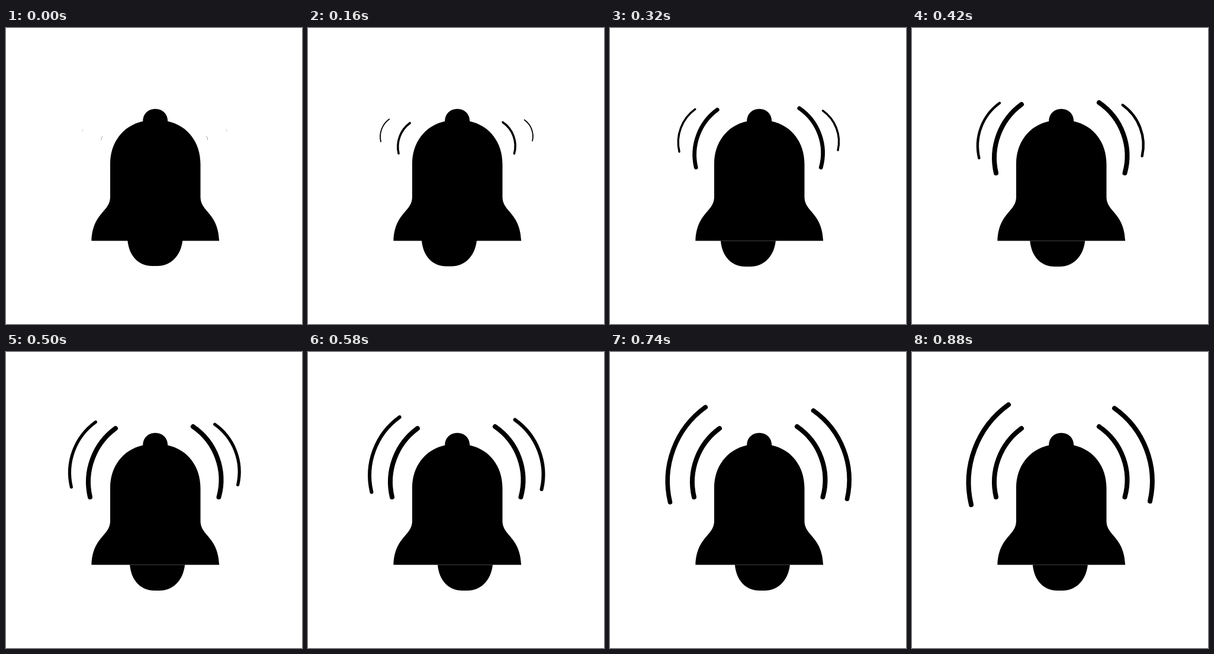
Write an HTML page that moves like this. It is 500 px wide and 500 px high and loops after 900 ms.

```html
<!DOCTYPE html>
<html lang="en">
<head>
<meta charset="utf-8">
<title>Ringing bell</title>
<style>
  html, body { margin: 0; width: 100%; height: 100%; overflow: hidden; background: #fff; }
  svg { display: block; width: 100vw; height: 100vh; }
  .wave { fill: none; stroke: #000; stroke-width: 8; stroke-linecap: round; }
</style>
</head>
<body>
<svg viewBox="0 0 500 500">
  <path id="clapper" d="M205.5 359C208 386 224 402.4 247 402.4H256C278 402.4 295.5 386 298.5 359Z"/>
  <path d="M231.3 157.5C231.3 145 240 136.7 252.2 136.7S273.2 145 273.2 157.5
    C307.5 165 328.5 194 328.5 229.500V285C328.5 311 358.200 311.5 360.2 359.4H144.4
    C146.4 311.5 176 311 176 285V229.5C176 194 197 165 231.3 157.5Z"/>
  <path class="wave" d="M185 129A112 112 0 0 0 142 245"/>
  <path class="wave" d="M316 126A109 109 0 0 1 359.5 245"/>
  <path class="wave" d="M163 89A162 162 0 0 0 100 258"/>
  <path class="wave" d="M342 95A151 151 0 0 1 402 252"/>
</svg>
<script>
  const LOOP = 900, STEP = 20;
  const clapper = document.getElementById('clapper');

  // Each wave grows linearly from its own centre: x, y, duration.
  const centres = [[162, 185.6, 405], [339.5, 185.8, 405], [129.7, 172.8, 800], [372.4, 172.8, 800]];
  const waves = [...document.querySelectorAll('.wave')].map((el, i) => {
    const [x, y, grow] = centres[i];
    return { el, x, y, grow };
  });

  const swing = [1.5, -23.5, 13.5, -1.6];
  const clamp = v => Math.min(1, Math.max(0, v));
  const lerp = (a, b, k) => a + (b - a) * k;

  function draw(ms) {
    const t = Math.floor((ms % LOOP) / STEP) * STEP + STEP;
    const leg = Math.min(2, Math.floor(t / 300));
    const x = lerp(swing[leg], swing[leg + 1], t / 300 - leg);
    const y = lerp(-0.5, 0.5, clamp(t / 300));
    clapper.setAttribute('transform', `translate(${x} ${y})`);

    for (const w of waves) {
      const s = clamp(t / w.grow);
      w.el.setAttribute('transform',
        `translate(${w.x} ${w.y}) scale(${s}) translate(${-w.x} ${-w.y})`);
    }
  }

  const start = performance.now();
  function tick() {
    draw(performance.now() - start);
    requestAnimationFrame(tick);
  }
  tick();
</script>
</body>
</html>
```
